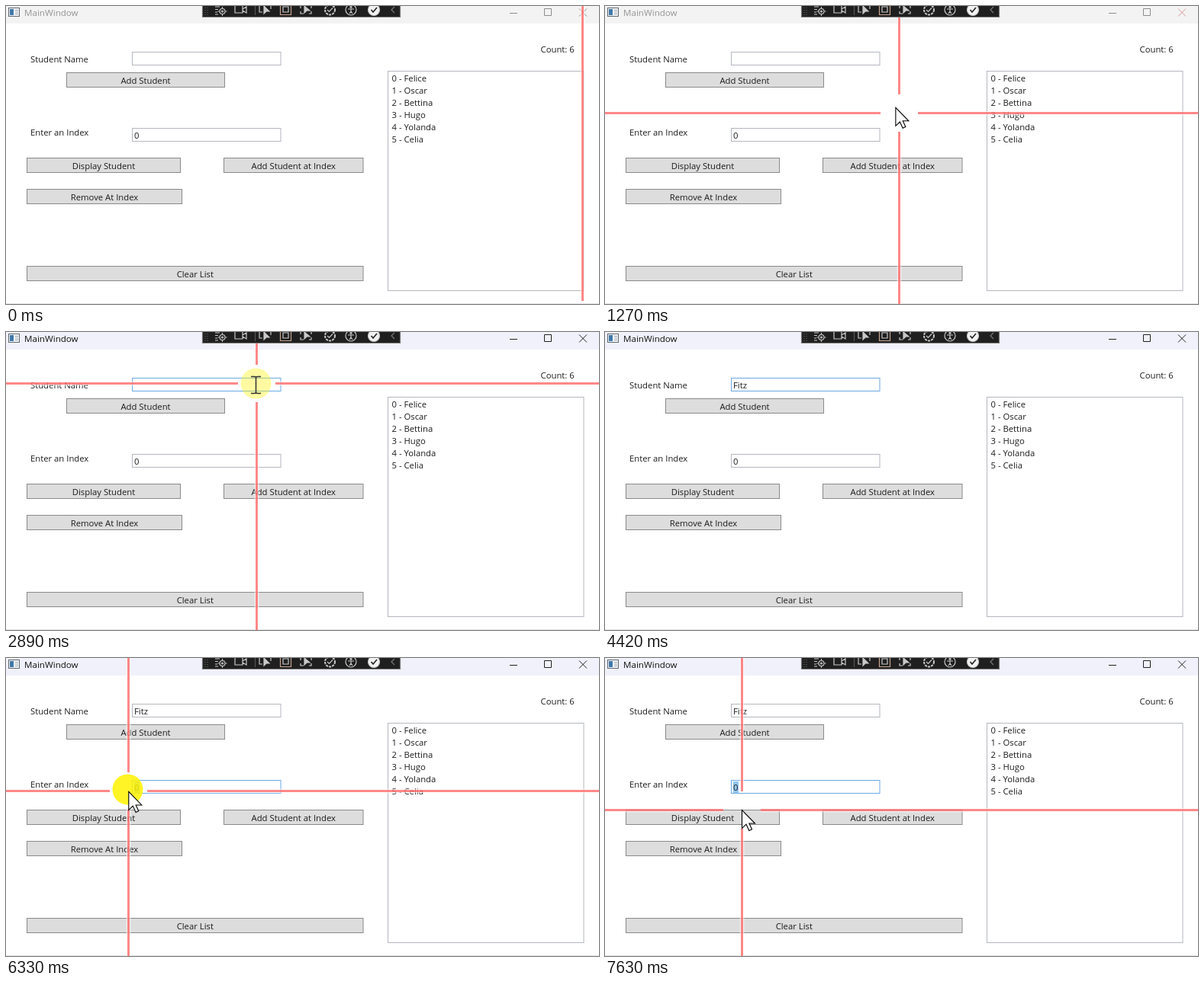
An HTML page for the animation above (8 s loop, 777 by 391 pixels).

```html
<!DOCTYPE html>
<html lang="en">
<head>
<meta charset="utf-8">
<title>MainWindow</title>
<style>
  html, body { margin: 0; width: 100%; height: 100%; overflow: hidden; background: #fff; }
  svg { display: block; width: 777px; height: 391px; }
  text { font: 11.3px "Open Sans", "Noto Sans", sans-serif; fill: #1c1c1c; white-space: pre; }
  .mid { text-anchor: middle; }
  .btn { fill: #ddd; stroke: #8a8a8a; }
  .btn.hover { fill: #bee6fd; stroke: #5b93bd; }
  .box { fill: #fff; stroke: #b4b7bf; }
  .box.hover { stroke: #7eb4ea; }
  .box.focus { stroke: #6ba8e5; }
  .bar { fill: #f3f3f3; }
  .title { fill: #949494; font-size: 11.6px; }
  .ctl { fill: none; stroke: #8c8c8c; }
  .close { stroke: #d99a9a; }
  .active .bar { fill: #f0f1fa; }
  .active .title { fill: #111; }
  .active .ctl { stroke: #222; }
  .icons { fill: none; stroke: #c9c9c9; stroke-width: 1.2; }
</style>
</head>
<body>
<svg id="stage" viewBox="0 0 777 391">
  <rect width="777" height="391" fill="#fff"/>
  <g id="frame">
    <rect class="bar" width="777" height="23"/>
    <rect x="3.5" y="2.5" width="14" height="11" fill="#f4f6f8" stroke="#5d6670"/>
    <rect x="5" y="4" width="5" height="8" fill="#3f78a8"/>
    <path d="M12 5.5h4M12 8h4M12 10.5h4" stroke="#9aa3ab"/>
    <text class="title" x="24" y="13">MainWindow</text>
    <path class="ctl" d="M660 9.5h10M705.5 3.5h9v9h-9z"/>
    <path class="ctl close" id="close" d="M751 3.5l10 10M761 3.5l-10 10"/>
  </g>
  <path d="M0 390.5H777" stroke="#e2e2e2"/>
  <g id="form"></g>
  <rect id="sel" x="168" y="162" width="7" height="15" fill="#0078d7" opacity=".42"/>
  <text id="name" x="168" y="73.5"></text>
  <text x="168" y="174">0</text>
  <path id="caret" stroke="#000" stroke-width="1.2"/>
  <circle id="spot" r="20" fill="#fff200"/>
  <g id="cross" fill="none">
    <path stroke="#fff" stroke-width="5.5" opacity=".6"/>
    <path stroke="#ff3535" stroke-width="3" opacity=".58"/>
  </g>
  <g class="icons">
    <path d="M257.5 -1V14.5H516.5V-1z" fill="#1f1f1f" stroke="#777"/>
    <path d="M261 2v11M264 2v11" stroke="#666" stroke-dasharray="1 2"/>
    <path d="M326.5 0v12" stroke="#555"/>
    <path d="M274 1h6M274 4.500h4M274 8h3M274 11h4"/>
    <circle cx="283.500" cy="7" r="3.500"/><circle cx="283.500" cy="7" r="1"/>
    <path d="M283.500 1v2M283.500 11v2M277.500 7h2M287.500 7h2"/>
    <path d="M300 0v9h10V0M310 4l5 -3v8l-5 -3"/>
    <path d="M332 0v8h4M347 0v4"/><path d="M338 0v10l3 -3h4z" fill="#c9c9c9"/>
    <path d="M359.500 0v11.500h14V0" stroke="#c8a58f"/><path d="M363 1h7v7h-7z"/>
    <path d="M386 0v3M386 7v3h4M400 0v3M400 7v3h-3"/><path d="M391 0v9l3 -3h4z" fill="#c9c9c9"/>
    <circle cx="424.500" cy="5" r="6.500" stroke-dasharray="3 1.200" stroke-width="2"/>
    <path d="M421 5l2.500 2.500l4.500 -5"/>
    <circle cx="452" cy="5" r="7"/><circle cx="452" cy="1.500" r="1"/>
    <path d="M448 4h8M452 4v3l-2 3M452 7l2 3"/>
    <circle cx="482" cy="5" r="7.500" fill="#f2f2f2"/>
    <path d="M478.500 5l2.500 3l5 -6" stroke="#222" stroke-width="1.600"/>
    <path d="M509 1l-4 4l4 4" stroke="#777"/>
  </g>
  <path id="arrow" d="M0 0V24L5.500 18.700L9.300 27L13 25.300L9.400 17.500H17Z" fill="#fff" stroke="#000" stroke-width="1.100"/>
  <path id="beam" d="M-6.500 -10.500H-2Q0 -10.500 0 -9Q0 -10.500 2 -10.500H6.500M0 -9V10M-6.500 11.500H-2Q0 11.500 0 10Q0 11.500 2 11.500H6.500" fill="none" stroke="#333" stroke-width="1.500"/>
</svg>
<script>
const LOOP = 8000, STEP = 71;
const $ = id => document.getElementById(id);
const form = $("form");

function add(tag, attrs, text = "") {
  const el = document.createElementNS("http://www.w3.org/2000/svg", tag);
  for (const k in attrs) el.setAttribute(k, attrs[k]);
  el.textContent = text;
  form.append(el);
  return el;
}
const label = (x, y, s, cls = "") => add("text", { x, y, class: cls }, s);
const box = (x, y, width, height, cls = "box") =>
  add("rect", { x: x + .5, y: y + .5, width, height, class: cls });
function button(x, y, w, s) {
  const el = box(x, y, w, 19, "btn");
  label(x + w / 2 + .5, y + 14.7, s, "mid");
  return el;
}

label(32, 74, "Student Name");
label(32, 170, "Enter an Index");
label(700.5, 61, "Count: 6");
const nameBox = box(165, 60, 194.500, 17);
const indexBox = box(165, 160, 194.500, 17);
button(79, 87, 207, "Add Student");
const display = button(27, 199, 201, "Display Student");
button(285, 199, 182.500, "Add Student at Index");
button(27, 240, 203, "Remove At Index");
button(27, 341, 440.500, "Clear List");
box(500, 85, 256.500, 288);
["Felice", "Oscar", "Bettina", "Hugo", "Yolanda", "Celia"]
  .forEach((s, i) => label(505.500, 99 + 16 * i, `${i} - ${s}`));

// pointer path: time, x, y
const path = [
  [0, 755, 411], [419, 755, 411], [490, 752, 410], [780, 700, 396], [990, 602, 377],
  [1060, 555, 362], [1130, 495, 300], [1200, 430, 215], [1270, 385, 140], [1340, 358, 98],
  [1550, 331, 62], [1629, 331, 62], [1700, 328, 57], [1919, 328, 57], [1990, 328, 67],
  [4499, 328, 67], [4570, 326, 74], [4850, 290, 105], [5130, 225, 160], [5340, 202, 175],
  [5740, 202, 175], [6100, 160, 172], [6259, 160, 172], [6330, 160, 174], [6600, 166, 195],
  [6860, 175, 207], [7000, 177, 206], [7159, 177, 206], [7230, 177, 204], [7469, 177, 204],
  [7540, 178, 201], [7630, 179, 199], [LOOP, 179, 199]
];
const typed = "Fitz", keys = [3180, 3490, 3640, 3810];
// mouse presses: down, up, fade start, fade end
const presses = [[2200, 2300, 2800, 2960], [5480, 6100, 6500, 6720]];
const SELECT = 6030;

// position held in steps; lead moves the pointer slightly ahead of the lines
function pos(t, lead = 0) {
  let i = path.length - 2;
  while (path[i][0] > t) i--;
  const [t0, x0, y0] = path[i], [t1, x1, y1] = path[i + 1];
  const q = Math.floor((t - t0) / STEP) * STEP + lead;
  const k = Math.min(1, q / (t1 - t0));
  return [x0 + (x1 - x0) * k, y0 + (y1 - y0) * k];
}
const within = ([x, y], l, t, r, b) => x > l && x < r && y > t && y < b;
const show = (el, on) => el.style.display = on ? "" : "none";
const move = (el, x, y) => el.setAttribute("transform", `translate(${x} ${y})`);

function render(t) {
  const [x, y] = pos(t), p = pos(t, 12);
  const focus = t < 2200 ? 0 : t < 5480 ? 1 : 2;
  const overName = within(p, 165, 60, 360, 78), overIndex = within(p, 165, 160, 360, 178);

  $("frame").classList.toggle("active", t >= 2270);
  $("close").classList.toggle("close", t >= 490 && t < 2270);
  nameBox.classList.toggle("hover", overName && t < 3180);
  nameBox.classList.toggle("focus", focus === 1);
  indexBox.classList.toggle("hover", overIndex);
  indexBox.classList.toggle("focus", focus === 2);
  display.classList.toggle("hover", within([x, y], 27, 199, 229, 219));

  const count = keys.filter(k => t >= k).length, name = $("name");
  name.textContent = typed.slice(0, count);
  show($("sel"), t >= SELECT);

  const last = count ? keys[count - 1] : 2200;
  const blink = Math.floor(Math.max(0, t - last - 80) / 530) % 2 === 0;
  show($("caret"), focus === 1 ? blink : focus === 2 && t < SELECT);
  const cx = focus === 1 ? 168.5 + (count ? name.getComputedTextLength() : 0) : 174.5;
  $("caret").setAttribute("d", `M${cx} ${focus === 1 ? 62 : 162}v15`);

  const press = presses.find(a => t >= a[0] && t < a[3]);
  show($("spot"), press);
  if (press) {
    const [, up, fade, end] = press;
    const [sx, sy] = pos(Math.min(t, up));
    move($("spot"), sx - .5, sy + .5);
    $("spot").setAttribute("opacity", .85 * Math.min(1, (end - t) / (end - fade)));
  }

  const lx = x + .5, ly = y + .5, gap = 24.5;
  const d = `M${lx} -5V${ly - gap}M${lx} ${ly + gap}V900M-5 ${ly}H${lx - gap}M${lx + gap} ${ly}H1600`;
  show($("cross"), t < 3490 || t >= 5410);
  for (const line of $("cross").children) line.setAttribute("d", d);

  const visible = t < 3180 || t >= 4570, text = overName || overIndex;
  show($("beam"), visible && text);
  show($("arrow"), visible && !text);
  move($("beam"), p[0] - .5, p[1] + 2);
  move($("arrow"), p[0] + .5, p[1] + .5);
}

const start = performance.now();
function tick() {
  render((performance.now() - start) % LOOP);
  requestAnimationFrame(tick);
}
tick();
</script>
</body>
</html>
```
